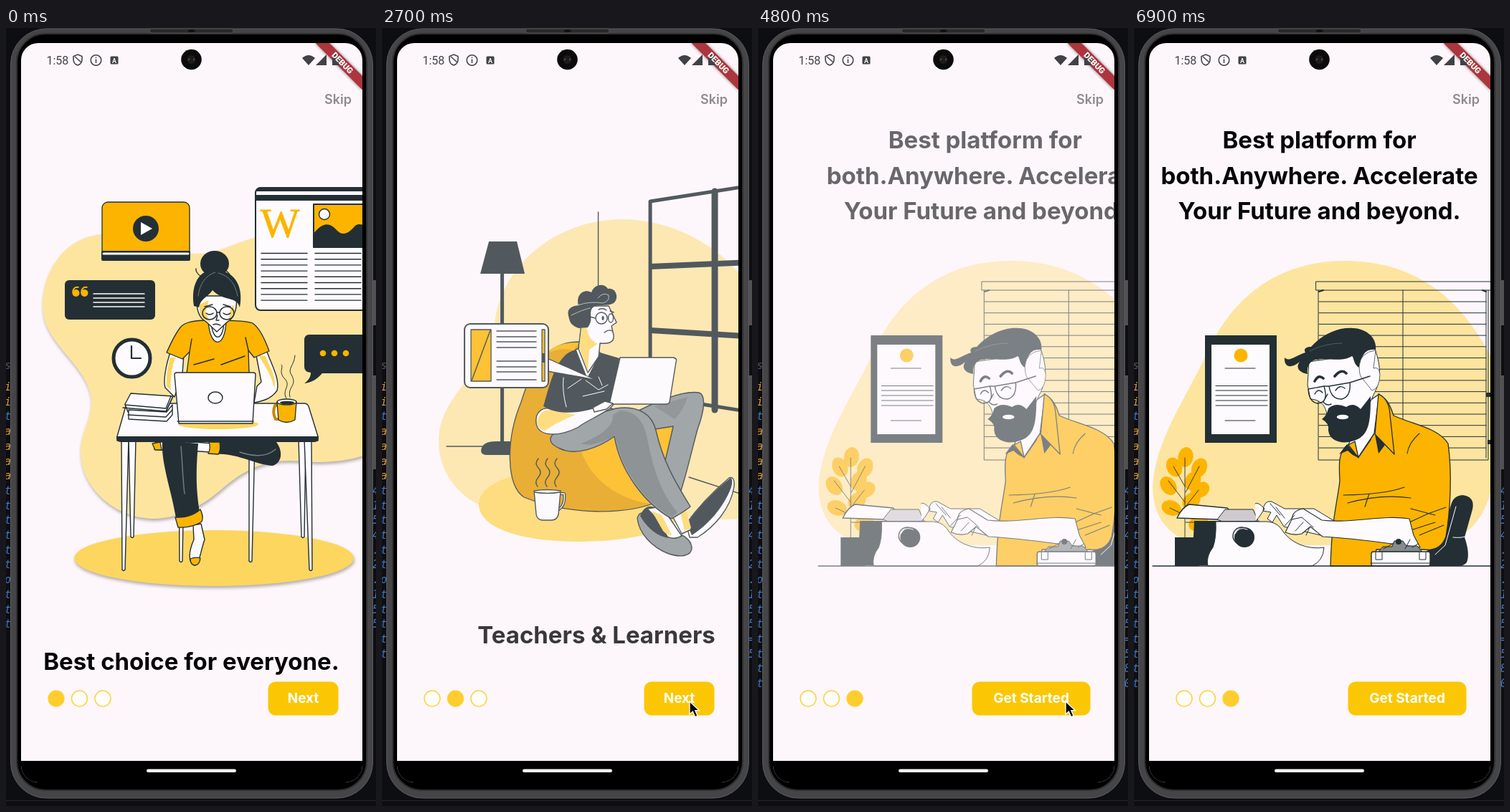
Recreate the animation shown at these times as an HTML page. Size 516 by 1086 pixels, loop 7 s.

```html
<!DOCTYPE html>
<html lang="en">
<head>
<meta charset="utf-8">
<title>Onboarding</title>
<style>
html, body { margin: 0; width: 100%; height: 100%; overflow: hidden; background: #0d0e11; }
svg { display: block; width: 100vw; height: 100vh; }
.k { fill: none; stroke: #232f34; stroke-width: 1.4; stroke-linecap: round; stroke-linejoin: round; }
.w { fill: #fefbfe; stroke: #232f34; stroke-width: 1.4; stroke-linejoin: round; }
.o { fill: #fdb400; stroke: #232f34; stroke-width: 1.3; stroke-linejoin: round; }
.y { fill: #fdb400; }
.d { fill: #232f34; }
.l { fill: none; stroke: #fefbfe; stroke-width: 1.4; stroke-linecap: round; }
.g { fill: #899093; stroke: #232f34; stroke-width: 1.4; stroke-linejoin: round; }
.blob { fill: #fde5a0; }
.floor { fill: #fdd65f; }
.soft { filter: drop-shadow(1px 3px 2px rgba(60, 55, 40, .38)); }
text { font-family: Inter, "Open Sans", sans-serif; }
.head { font-size: 33px; font-weight: 700; text-anchor: middle; fill: #050507; }
.ui { font-size: 19px; font-weight: 700; text-anchor: middle; fill: #fff; }
.code { font: italic 15px "DejaVu Sans Mono", monospace; }
</style>
</head>
<body>
<svg id="stage" viewBox="0 0 516 1086" preserveAspectRatio="none"></svg>
<script>
const LOOP = 7000, STEP = 100, PAGE_W = 476;

const seq = (start, n, step) => Array.from({ length: n }, (_, i) => start + i * step);
const p = (cls, d, more = '') => `<path class="${cls}" d="${d}" ${more}/>`;
const box = (cls, x, y, w, h, r = 0, more = '') =>
  `<rect class="${cls}" x="${x}" y="${y}" width="${w}" height="${h}" rx="${r}" ${more}/>`;
const oval = (cls, cx, cy, rx, ry = rx, more = '') =>
  `<ellipse class="${cls}" cx="${cx}" cy="${cy}" rx="${rx}" ry="${ry}" ${more}/>`;
const rows = (cls, x1, x2, ys, more = '') => p(cls, ys.map(y => `M${x1} ${y}H${x2}`).join(''), more);
const leg = (x1, x2, y1, y2, w = 5) =>
  p('w', `M${x1 - w} ${y1}L${x2 - 2} ${y2}Q${x2} ${y2 + 3} ${x2 + 2} ${y2}L${x1 + w} ${y1}Z`);
const leaf = (cls, x, y, rx, ry, turn) => oval(cls, x, y, rx, ry, `transform="rotate(${turn} ${x} ${y})"`);
const head = (x, y, s) => `<text class="head" x="${x}" y="${y}">${s}</text>`;

const room = [
  p('blob soft', 'M51 390C50 340 82 292 133 288C190 282 222 316 270 315C305 313 330 292 372 288C440 280 480 300 520 330V588C490 604 450 608 415 605C370 600 340 612 310 636C280 662 250 684 205 685C150 684 104 640 104 592C104 560 122 545 118 514C112 470 52 440 51 390Z'),
  oval('floor soft', 290, 740, 195, 39),
  box('o', 134, 243, 122, 80, 8), box('d', 133, 311, 124, 14, 2),
  rows('l', 136, 254, [315], 'style="stroke-width:3"'),
  oval('d', 195, 280, 18), p('', 'M188 271V289L204 280Z', 'fill="#fff"'),
  box('d', 82, 352, 126, 55, 6),
  ...[97.5, 109.5].map(x => oval('y', x, 370, 5) + p('', `M${x - 4} 370C${x - 5} 363 ${x} 361 ${x + 4} 362`, 'fill="none" stroke="#fdb400" stroke-width="2"')),
  rows('l', 122, 193, [371, 377, 383, 389]),
  oval('w', 175.5, 461, 25.5, 26, 'style="stroke-width:5"'),
  p('k', 'M175 444V461H188', 'style="stroke-width:2.2"'),
  box('w', 348, 223, 170, 171, 7, 'style="stroke-width:2"'),
  p('d', 'M349 228Q350 222 356 222H520V228Z'), box('d', 348, 233, 160, 8),
  '<text x="382" y="292" style="font:58px Liberation Serif,serif" fill="#fdb400" stroke="#fdb400" stroke-width=".8" text-anchor="middle">W</text>',
  box('o', 429, 246, 90, 60, 0, 'style="stroke-width:2"'),
  p('d', 'M429 287C442 270 452 272 461 282C471 293 480 284 487 276C494 271 503 276 520 286V307H429Z'),
  oval('w', 444, 260, 7.5),
  rows('k', 356, 420, seq(314.5, 9, 8.2)), rows('k', 431, 495, seq(314.5, 9, 8.2)),
  p('d', 'M423 428H520V482H441C434 490 426 495 416 496C423 491 425 486 425 481Q416 480 416 473V436Q416 428 423 428Z'),
  ...[442, 458, 474].map(x => oval('y', x, 454, 4.3)),
  leg(245, 244, 578, 744, 4), leg(343, 341, 578, 744, 4),
  // crossed legs
  p('w', 'M206 580C218 574 240 582 262 578L290 580V593C260 588 230 592 207 588Z'),
  p('o', 'M204 580L215 578L217 589L208 589Z'),
  p('w', 'M261 694L262 714C255 730 253 746 263 750C270 748 270 735 277 714L272 692Z'),
  p('o', 'M257 741Q264 738 271 740Q270 750 263 750Q257 749 257 741Z'),
  p('d', 'M218 576C216 608 231 646 237 684L271 681C263 638 266 606 268 580Z'),
  p('l', 'M244 584C246 605 246 625 249 650', 'style="stroke:#778083"'),
  p('o', 'M236 683C250 684 262 680 271 672Q276 682 273 689Q259 698 240 697Z'),
  p('d', 'M294 578H377C386 590 386 606 372 611C350 610 318 592 294 595Z'),
  p('l', 'M326 592C350 600 366 597 376 588', 'style="stroke:#778083"'),
  p('o', 'M283 578H298Q300 590 296 595L282 594Q286 586 283 578Z'),
  leg(176, 176, 574, 710), leg(413, 414, 574, 710),
  leg(166, 164, 574, 756), leg(421, 425, 574, 756),
  // desk
  p('w', 'M171 524H416Q420 524 422 528L435 570V576H155V570L167 528Q168 524 171 524Z'),
  p('d', 'M154 570H436Q436 578 430 578H160Q154 578 154 570Z'),
  oval('floor', 296, 553, 56, 7),
  // person
  p('w', 'M230 450C223 470 219 492 222 502L235 515L246 483L248 455Z'),
  p('w', 'M348 452L364 452C372 474 382 490 378 506C370 518 357 521 346 523L350 500L356 494Z'),
  p('floor', 'M352 457L362 458C369 476 378 490 374 503Q372 487 352 457ZM229 460L236 460Q228 485 230 505L224 500Q223 480 229 460Z'),
  p('w', 'M280 402H310L308 436Q296 450 284 434Z'),
  p('o', 'M282 408C260 408 248 411 243 418C234 430 229 442 224 453L246 462L256 452L252 482H339L338 450L346 460L367 451C362 437 354 419 344 412C335 408 320 409 307 408C306 449 284 448 282 408Z'),
  p('k', 'M286 410C288 439 303 438 304 410M256 452L259 434M338 450L334 432M262 470L290 462M300 470L333 458'),
  p('w', 'M268 374C264 390 268 404 279 410L294 424L309 410C319 404 323 390 321 374Z'),
  p('floor', 'M270 386L283 380L278 397L285 411L276 407Q268 399 270 386ZM311 408L319 396L317 386Q311 394 311 408Z'),
  oval('d', 291, 329, 20, 18),
  p('d', 'M262 388C257 355 272 336 292 338C318 338 332 360 326 390C322 374 303 382 288 366C281 376 271 378 269 390Z'),
  p('l', 'M292 341C278 345 270 358 268 374M296 342C312 346 320 358 323 374', 'style="stroke:#87908f;stroke-width:.8"'),
  p('k', 'M272 347Q264 341 265 336M306 338Q314 344 313 349'),
  oval('k', 284, 398, 10, 9), oval('k', 308, 398, 10, 9),
  p('k', 'M294 397H298M279 398Q284 402 289 398M303 398Q308 402 313 398M295 401L293 408H297M289 414Q294 412 299 415M277 389L288 386M303 386L313 389'),
  p('w', 'M238 481H345Q348 481 348 484L344 552H241L235 484Q235 481 238 481Z'),
  p('k', 'M239 549H345'), oval('w', 292, 516, 10, 8),
  // books and cup
  p('w', 'M166 525L174 510L233 514L223 536H170Z'), p('k', 'M163 530L223 535L232 516M166 526L223 531L230 514'),
  p('w', 'M171 533L224 536L232 526V540L224 549L171 546Z'), p('k', 'M170 540L223 543L232 533'),
  p('k', 'M380 527H375Q371 537 376 546H383', 'style="stroke:#c88a00;stroke-width:4"'),
  p('o', 'M378 522H405L403 547Q391 554 380 547Z'), oval('w', 391.5, 522, 13.5, 4), oval('d', 392, 523, 10, 2.3),
  p('k', 'M391 517C384 505 398 500 389 490C379 480 388 473 384 470M396 515C392 500 407 500 398 484C392 476 402 471 403 457', 'style="stroke-width:1"'),
  head(258.5, 896, 'Best choice for everyone.')
].join('');

const wave = x => `M${x} 601q-6 7 0 13t0 13t-1 13`;
const lounge = [
  p('blob', 'M39 572C42 510 104 486 117 410C130 320 214 267 294 267C382 267 476 325 500 424V678C480 686 440 688 405 684L110 672C62 655 37 615 39 572Z'),
  p('floor', 'M95 665C96 628 170 614 240 616C330 616 385 640 386 666C380 702 310 717 230 717C145 716 95 695 95 665Z'),
  oval('floor', 496, 684, 18, 11),
  p('k', 'M261.5 257V364M50 584H139M388 627L500 663'),
  // window
  p('k', 'M334 470V242L500 216M405 525L500 540', 'style="stroke-width:5"'),
  p('k', 'M424 228V533', 'style="stroke-width:9"'),
  p('k', 'M334 333L500 326M334 422L500 432', 'style="stroke-width:8;stroke-linecap:butt"'),
  p('k', 'M486 503C484 530 490 562 500 592'),
  ...[[487, 503, 0], [479, 520, -50], [492, 519, 25], [476, 536, -55], [493, 545, 40], [477, 553, -60], [483, 575, -60], [496, 568, 40]].map(a => leaf('d', a[0], a[1], 4.5, 8, a[2])),
  // lamp
  p('d', 'M109 298H148L159 343H97Z'), box('d', 125, 343, 5, 240),
  p('d', 'M98 590Q99 577 119 577H139V596H107Q98 596 98 590Z'),
  // bean bag
  p('o', 'M234 438C194 438 171 466 154 522C132 575 133 640 158 655C220 680 300 681 348 660C388 642 371 560 330 545L240 520Z', 'style="fill:#e39b00"'),
  p('y', 'M235 439Q203 438 190 455Q207 444 227 450ZM236 584C244 620 280 656 333 664C374 652 373 600 366 556L295 555Z'),
  // far leg
  p('g', 'M318 534C350 518 382 506 402 509C411 512 411 530 400 560C389 600 381 640 369 668L346 650C350 620 361 580 366 556L340 560Z'),
  p('', 'M368 546Q382 532 386 515L340 528Z', 'fill="#787e80"'),
  // near leg and shoes
  p('w', 'M384 692C400 670 424 645 444 628Q452 625 451 640C446 671 424 696 400 711L389 711Z'),
  p('d', 'M385 692C400 670 424 645 446 628Q450 630 447 641C436 670 414 694 392 708Z'),
  p('w', 'M360 672L377 664L391 700L378 706Z'),
  p('floor', 'M374 668L382 665L391 698L382 702Z'),
  p('g', 'M316 684C319 673 329 674 340 689C359 704 389 704 392 725C392 738 376 739 360 734C336 725 318 705 316 684Z'),
  p('d', 'M320 681C327 662 342 665 350 680C358 686 371 695 376 709C358 718 334 706 320 681Z'),
  p('w', 'M330 671L350 668L378 709Q366 715 358 710Q345 685 330 671Z'),
  p('floor', 'M336 674L350 680L364 708Q354 708 349 697Z'),
  p('g', 'M195 572C200 558 230 547 286 531C318 526 337 540 342 562C351 602 367 631 390 668C382 675 372 680 364 685C328 665 292 620 284 570C262 586 230 598 208 587C197 582 194 578 195 572Z'),
  p('', 'M292 534C316 535 326 551 330 574C338 614 349 650 372 676L364 683C329 663 293 618 285 568C270 578 250 585 238 580C262 570 283 558 282 540Z', 'fill="#70787a"'),
  // torso
  p('w', 'M175 552C173 536 184 528 197 532C230 538 260 522 283 525C277 536 244 548 234 557C205 572 178 570 175 552Z'),
  p('floor', 'M176 550Q180 532 196 533L230 540Q206 549 187 562Q177 560 176 550Z'),
  p('w', 'M230 449L246 490L265 454L248 440Z'),
  p('d', 'M230 449C204 455 195 492 185 528C208 543 245 537 276 524H282L291 461L264 453L246 490Z'),
  p('l', 'M213 488Q211 508 217 529M219 503L238 490M244 492L262 505L275 498M240 514L270 507M262 487L267 499', 'style="stroke-width:1"'),
  p('w', 'M247 388H276L287 411L280 416L283 429C284 440 274 441 264 440L262 459L247 481L234 448L238 412Z'),
  p('floor', 'M239 413L246 411Q243 431 260 441L249 449L247 480L235 446Z'),
  p('d', 'M220 402C217 390 227 388 234 387C230 374 240 363 252 369C256 357 270 356 275 364C287 362 291 378 283 384C272 390 257 383 252 393C249 401 255 407 247 418L234 419C222 414 222 410 220 402Z'),
  p('l', 'M233 387Q250 381 268 384Q278 381 276 373Q268 368 261 377M224 401Q240 393 250 391', 'style="stroke:#a9b0ae;stroke-width:1"'),
  oval('k', 266, 405, 8), oval('k', 279, 405, 3.5, 6), oval('d', 268, 405, 1.5, 3),
  p('k', 'M257 405L242 401M262 393Q268 390 273 394M278 395L283 397M270 425Q276 420 281 423'),
  p('w', 'M292 460H366Q372 461 370 466L361 522Q360 525 356 525H277Z'),
  p('w', 'M254 530L271 521L282 524L273 532L256 536Z'),
  // tablet
  p('w', 'M192 462L254 490L190 479Z'),
  box('w', 75, 413, 117, 89, 8, 'style="stroke-width:2"'),
  box('o', 84, 421, 28, 72), p('k', 'M85 492L111 422'),
  rows('k', 120, 175, [423, 431, 438, 446, 465, 473, 480, 491]),
  box('o', 183, 421, 4, 72), box('d', 183, 454, 4, 13),
  p('w', 'M193 463L254 490L193 476', 'style="stroke-width:0"'),
  // mug
  p('k', wave(178) + wave(191) + wave(204)),
  p('k', 'M208 650H214Q216 667 205 673', 'style="stroke-width:4"'), p('l', 'M208 650H214Q216 667 205 673'),
  p('w', 'M172 646Q190 643 209 646L206 679Q204 687 196 687H183Q176 686 175 679Z'),
  p('k', 'M173 648Q190 651 208 648'),
  head(259, 859, 'Teachers &amp; Learners')
].join('');

const office = [
  p('blob', 'M26 640C30 570 80 506 104 448C146 362 214 325 294 325C374 325 450 360 500 464V636C490 690 460 715 420 722H110C58 722 26 690 26 640Z'),
  // blinds
  box('k', 254, 354, 245, 12, 0, 'style="stroke-width:1"'), p('k', 'M257 366V603H494V366M491 366V600M375 366V603', 'style="stroke-width:1"'),
  rows('k', 258, 491, seq(382, 14, 15.7), 'style="stroke-width:1"'),
  p('k', 'M258 368L264 366M491 368L486 366', 'style="stroke-width:2"'),
  box('d', 491, 509, 6, 6), box('d', 493, 575, 4, 6),
  // framed page
  box('d', 99, 429, 100, 150), box('', 108, 442, 81, 125, 0, 'fill="#fefbfe"'),
  oval('y', 149, 457, 9.5),
  rows('k', 127, 169, [475, 548], 'style="stroke-width:1"'), rows('k', 114, 186, [499.5, 506, 513, 520, 527], 'style="stroke-width:1.1"'),
  // plant
  ...[[72, 599, 10], [56, 613, -25], [91, 614, 25], [48, 639, -35], [82, 632, 30], [92, 645, 60], [52, 670, -70], [80, 660, 50], [90, 692, 75]].map(a => leaf('y', a[0], a[1], 10.5, 14, a[2])),
  p('k', 'M71 713V600M71 640L55 612M72 648L91 612M71 662L48 632M72 668L90 645M71 680L50 670M72 690L89 690', 'style="stroke-width:.9"'),
  // chair
  p('d', 'M424 722L442 666Q445 653 458 652Q476 654 472 672L461 711Q469 734 464 746Q460 751 452 751H404V732Z'),
  p('l', 'M449 668L434 722L420 735M445 711Q457 712 461 710', 'style="stroke-width:1"'),
  // torso
  p('o', 'M298 582C284 592 286 612 287 632C284 660 276 682 274 751H332L338 728H404C420 730 430 724 435 710C441 675 444 622 438 580C424 558 390 554 362 541C356 522 350 516 341 511L330 575L314 598Z'),
  p('k', 'M381 594Q383 579 398 566M298 663Q345 650 386 656M292 652Q350 651 377 641M322 668L328 650M384 690L410 678L435 669M386 671L420 680M389 700L420 690M398 708L432 694', 'style="stroke-width:1.1"'),
  p('w', 'M326 522L342 511L335 566L313 599L298 584Z'),
  p('o', 'M299 582L313 600L308 577ZM341 511Q356 518 357 540L363 595L336 567Z'),
  p('d', 'M297 581L286 595L298 590L305 596L313 600ZM336 567L341 594L350 582L363 595Z'),
  // head
  p('w', 'M244 466C265 462 290 462 304 452L336 448C345 474 345 492 334 512L326 530L322 562L270 545C268 528 262 519 246 518L242 498Z', 'style="stroke-width:1"'),
  p('d', 'M210 460C216 467 226 457 239 453C236 448 240 445 247 445C262 428 285 417 306 419C326 420 339 434 337 449C325 447 318 453 314 474C306 470 307 460 304 458C288 468 268 458 250 464Q240 470 242 483C230 481 225 474 231 466C219 476 209 474 210 460Z'),
  p('w', 'M314 472Q316 452 337 450L334 475Q342 472 343 484Q342 504 332 506L319 490Q314 487 314 472Z', 'style="stroke-width:.7"'),
  p('l', 'M245 451Q266 440 290 440', 'style="stroke:#667072;stroke-width:.7"'),
  p('d', 'M262 546Q269 541 271 531Q281 522 296 529Q306 522 316 532L330 514C330 548 328 564 314 573C296 583 273 579 271 562Q273 552 262 546Z'),
  oval('w', 291, 543, 9, 4),
  p('k', 'M252 493Q257 483 264 489M280 486Q289 475 296 482', 'style="stroke-width:3.6"'),
  p('k', 'M243 504L265 500Q272 523 256 524Q244 522 243 504ZM272 500L301 495Q303 514 290 518Q275 519 272 500ZM265 500H272M301 495L329 486M281 506Q287 497 294 503M252 511Q257 502 263 509M270 511L264 522Q269 528 275 525', 'style="stroke-width:1.4"'),
  // typewriter
  p('w', 'M60 684Q67 669 77 665L130 670L147 687Z'),
  p('', 'M116 686L127 672H166L174 690H126Z', 'fill="#cfcace" stroke="#232f34"'),
  box('d', 57, 711, 34, 40), p('d', 'M84 688H174L195 699L180 750H81Z'),
  p('w', 'M114 689H186Q201 690 208 703C222 722 246 728 265 725Q264 744 248 751H103Q100 738 110 725Q115 712 114 689Z', 'style="stroke-width:1"'),
  oval('w', 150, 709, 12), oval('d', 154, 711, 14), p('l', 'M141 706Q146 695 158 700', 'style="stroke-width:1"'),
  // arms
  p('w', 'M169 664Q173 661 182 671L175 682L170 688M180 674Q181 659 192 661L210 671L251 671L284 691L260 708L209 696L199 680L193 690L186 685L191 676Z', 'style="stroke-width:1"'),
  p('w', 'M211 704L220 686Q221 673 236 671L262 687C303 692 348 679 384 685L390 708L399 725C350 719 307 712 263 710L246 696L234 706Q223 709 211 704Z', 'style="stroke-width:1.1"'),
  p('k', 'M190 664L204 680M198 669L210 684M220 686L234 683L250 697M210 695L224 680M225 702L236 690M240 708L245 697', 'style="stroke-width:1"'),
  // small machine
  p('', 'M341 731L347 724H360L363 716H375L380 723H395L402 731Z', 'fill="#858b8e" stroke="#232f34"'),
  oval('d', 369, 717, 4), p('k', 'M348 727L362 719M378 727L385 714M388 725L396 720', 'style="stroke-width:1"'),
  box('w', 331, 731, 82, 20, 3), p('k', 'M337 732V742H346V732M398 732V742H407V732M330 747H414', 'style="stroke-width:1"'),
  p('k', 'M26 751H500'),
  head(258.5, 168, 'Best platform for'),
  head(258.5, 218, 'both.Anywhere. Accelerate'),
  head(258.5, 267, 'Your Future and beyond.')
].join('');

const codeLine = (i, l, r, c) => {
  const y = 506 + i * 20.7;
  return `<g class="line" fill="${c}"><text class="code" x="7" y="${y}" text-anchor="end">${l}</text><text class="code" x="511" y="${y}">${r}</text></g>`;
};
const left = 'i ui t ta ta ta ta ut ut ut ut ut it o ut ut ut ut ut ut ut'.split(' ');
const right = '.......4154.2.155=580'.split('');
const code = left.map((s, i) => codeLine(i, s, i < 7 ? '' : right[i], i < 7 && i !== 2 ? '#d99b3a' : '#3f78c9')).join('');

const page = (s, i) => `<g id="page${i}"><g clip-path="url(#screen)">${s}</g></g>`;
const chrome = [
  '<text x="463" y="106" style="font-size:18px;font-weight:600" fill="#8d8a8e" text-anchor="middle">Skip</text>',
  '<text x="56.5" y="50.5" style="font:16px Roboto,sans-serif" fill="#424145">1:58</text>',
  '<g fill="none" stroke="#48464b" stroke-width="1.6">',
  '<path d="M100 37L106 39.5V44Q106 50 100 52Q94 50 94 44V39.5ZM96 40L105 48"/><circle cx="125.5" cy="45" r="7.3"/><path d="M125.5 43.5V49M125.5 40.5V42"/></g>',
  box('', 145.5, 39.5, 11, 11, 1.5, 'fill="#424145"'),
  '<text x="151" y="48.5" style="font:700 9px Roboto,sans-serif" fill="#fff" text-anchor="middle">A</text>',
  p('', 'M413 42Q422 34 431 42L422 52ZM447 37V52H432Z', 'fill="#424145"'),
  p('', 'M431.5 21H451L497 67V86.5Z', 'fill="#ad353d" style="filter:drop-shadow(0 0 2px #0008)"'),
  p('', 'M455 39H458V37H462V39H465V52H455Z', 'fill="#424145"'),
  '<text transform="translate(466.4 51.6) rotate(45)" style="font:900 11.5px Roboto,sans-serif" fill="#fff" text-anchor="middle">DEBUG</text>',
  oval('', 258.5, 44, 14.3, 14.3, 'fill="#0b0b0c"'), oval('', 258.5, 44, 6, 6, 'fill="#1c1c1d"'),
  oval('', 255, 44, 1.2, 1.2, 'fill="#5a4d32"'), oval('', 262, 44, 1.2, 1.2, 'fill="#5a4d32"'),
  ...[70, 102.5, 135].map(x => `<circle class="dot" cx="${x}" cy="936" r="11" stroke="#fbd23f" stroke-width="1.5"/>`),
  '<rect id="btn" y="912.5" height="47" rx="10.5" fill="#fbc705"/><text id="label" class="ui" y="942"></text>',
  box('', 21, 1023, 476, 40, 0, 'fill="#000"'), box('', 196, 1034.5, 125, 4.6, 2.3, 'fill="#f5f5f5"')
].join('');

const $ = id => document.getElementById(id);
$('stage').innerHTML = [
  '<defs><clipPath id="screen"><rect x="21" y="21" width="476" height="1040"/></clipPath><clipPath id="glass"><rect x="21" y="21" width="476" height="1032" rx="24"/></clipPath></defs>',
  '<rect width="516" height="1086" fill="#0d0e11"/><path d="M0 1078.5H516" stroke="#25232d"/>',
  '<text class="code" x="7" y="476" text-anchor="end" fill="#555">s</text>', code,
  box('', 511, 352, 6, 63, 1, 'fill="#515153"'), box('', 511, 485, 6, 131, 1, 'fill="#515153"'),
  // phone body
  box('', 6.5, 1, 505, 1074, 50, 'fill="#454547" stroke="#5c5c5e"'),
  box('', 15, 8, 488, 1056, 40, 'fill="#000" stroke="#303032" stroke-width="2"'),
  box('', 200, 1, 117, 6, 3, 'fill="#29292b" stroke="#555"'), oval('', 258.5, 4, 5, 2, 'fill="#111"'),
  '<g clip-path="url(#glass)"><rect x="21" y="21" width="476" height="1032" fill="#fdf7fc"/>',
  [room, lounge, office].map(page).join(''), chrome, '</g>',
  '<path id="mouse" d="M0 0V18L4.3 14L7.5 21.5L11 20L7.8 12.7H13.5Z" fill="#050505" stroke="#fff" stroke-width="1.3"/>'
].join('');

const clamp = v => Math.min(1, Math.max(0, v));
const smooth = v => v * v * (3 - 2 * v);
const dots = [...document.querySelectorAll('.dot')];
const lines = [...document.querySelectorAll('.line')];
const pages = [0, 1, 2].map(i => $('page' + i));
const slides = [1743, 4003];
const fades = [-2000, 2190, 4415];
const logs = [1900, 2200, 4200, 4500];

function draw(t) {
  const moved = slides.map(s => smooth(clamp((t - s) / 400)));
  const scroll = moved[0] + moved[1];
  pages.forEach((el, i) => {
    const k = clamp((t - fades[i]) / 1000);
    const x = (i - scroll) * PAGE_W + 130 * (1 - k) ** 1.65;
    el.setAttribute('transform', `translate(${x.toFixed(2)} 0)`);
    el.setAttribute('opacity', clamp(k / .65));
    el.style.display = Math.abs(i - scroll) < 1 ? '' : 'none';
  });

  const current = Math.round(scroll);
  dots.forEach((el, i) => el.setAttribute('fill', i === current ? '#fdcc2d' : '#fffdfd'));
  const x = current === 2 ? 298.5 : 365.5;
  $('btn').setAttribute('x', x);
  $('btn').setAttribute('width', 463.5 - x);
  $('label').setAttribute('x', (x + 463.5) / 2);
  $('label').textContent = current === 2 ? 'Get Started' : 'Next';

  const shown = 17 + logs.filter(s => t >= s).length;
  lines.forEach((el, i) => { el.style.display = i < shown ? '' : 'none'; });

  const enter = smooth(clamp((t - 900) / 500)), exit = smooth(clamp((t - 5300) / 400));
  const mx = 401 + 28 * enter - 36 * exit, my = 981 - 41 * enter + 52 * exit;
  $('mouse').setAttribute('transform', `translate(${mx} ${my})`);
  $('mouse').style.display = t >= 900 && t < 5800 ? '' : 'none';
}

const start = performance.now();
function tick() {
  const t = (performance.now() - start) % LOOP;
  draw(Math.floor(t / STEP) * STEP);
  requestAnimationFrame(tick);
}
tick();
</script>
</body>
</html>
```
